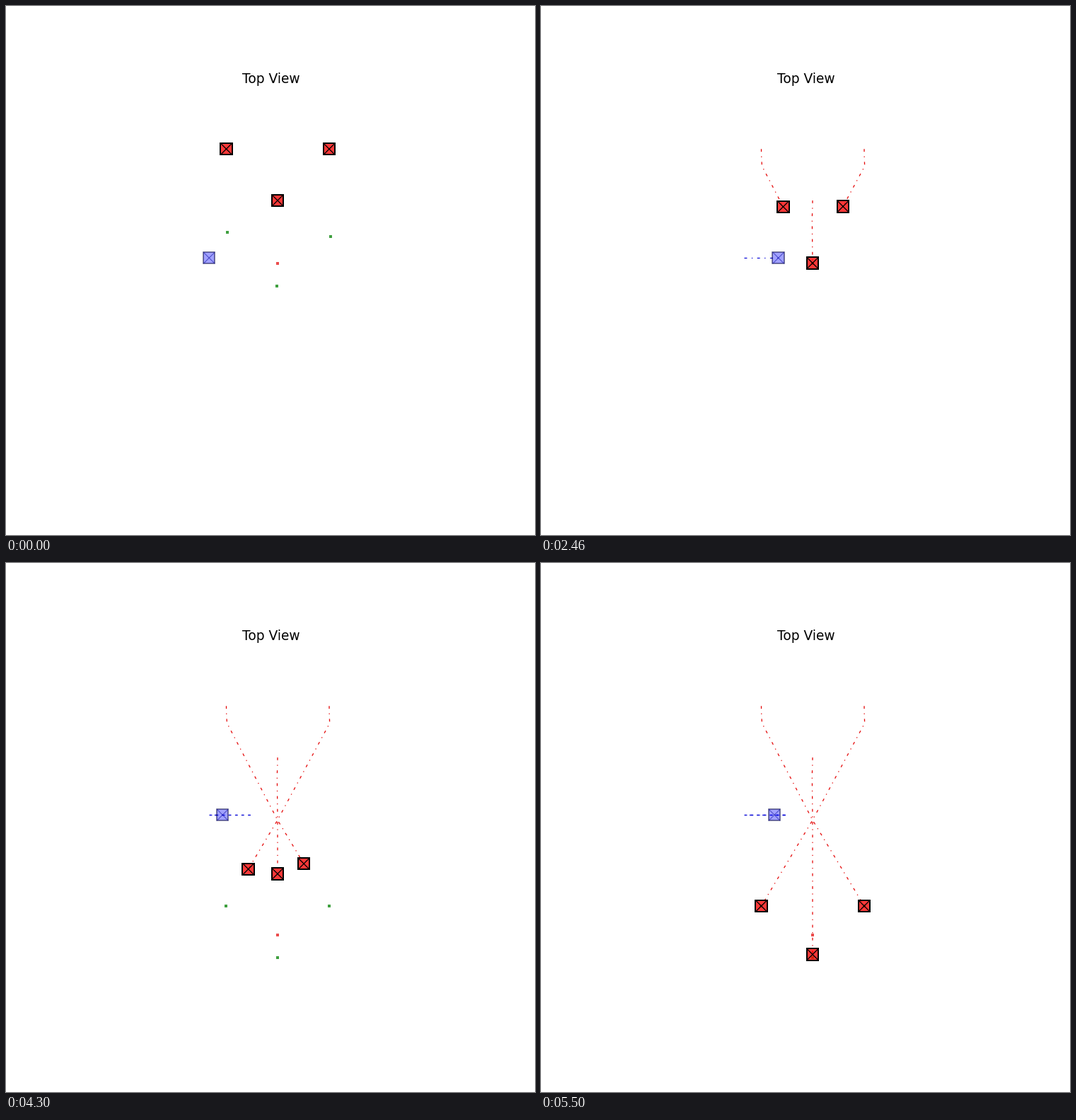
A matplotlib script for the animation above (7080 ms loop, 748 by 748 pixels).

```python
import numpy as np
import matplotlib.pyplot as plt
from matplotlib.animation import FuncAnimation
from matplotlib.patches import Rectangle

SIZE, DPI = 748, 100
PT = 72 / DPI                      # points per pixel
TICK, HOLD, STEP, LAST = 20, 1580, 80, 50
LOOP = 2 * HOLD + (LAST - 1) * STEP
GATE = np.array([384.0, 363.5])
GOAL = np.array([384.0, 525.5])
SHAPE = np.array([[-72.5, -40.5], [73.0, -40.5], [0.0, 32.4]])
TURN, REGROUP, LEAVE = 3, 4, 25    # steps at which the formation changes
HALF = 8.2


def slots(k):
    """Formation points: turning, then squeezed into the gate, then open."""
    if k < TURN:
        a = np.radians(2.2 + 3.4 * k)
        rot = np.array([[np.cos(a), -np.sin(a)], [np.sin(a), np.cos(a)]])
        return GATE + SHAPE @ rot.T
    if k < LEAVE:
        return np.tile(GATE, (3, 1))
    return GOAL + SHAPE


def walk(p, target, speed):
    d = target - p
    dist = np.hypot(*d)
    return target.copy() if dist <= speed else p + d * speed / dist


def simulate():
    pos = [np.array(p) for p in ((311.5, 202.2), (457.0, 202.2), (384.0, 275.0))]
    track = [pos]
    for k in range(1, LAST + 1):
        if k > LEAVE:
            goals, speeds = slots(k)[[1, 0, 2]], (7.2, 8.07, 7.6)
        else:
            goals, speeds = slots(k - 1), (8.09,) * 3
        if k != REGROUP:
            pos = [walk(p, g, s) for p, g, s in zip(pos, goals, speeds)]
        track.append(pos)
    return np.array(track)


def patrol():
    u = np.arange(LAST + 1) % 30.3
    x = 287.2 + 4.04 * np.minimum(u, 30.3 - u)
    return np.column_stack([x, np.full(LAST + 1, 356.2)])


fig = plt.figure(figsize=(SIZE / DPI, SIZE / DPI), dpi=DPI, facecolor="white")
ax = fig.add_axes([0, 0, 1, 1])
ax.set_xlim(0, SIZE)
ax.set_ylim(SIZE, 0)
ax.axis("off")
ax.text(374.5, 109, "Top View", family="DejaVu Sans", size=18.7 * PT,
        ha="center", va="baseline")


class Drone:
    def __init__(self, track, trail, face, edge, cross, edge_px, cross_px, z):
        self.track = track
        self.trail, = ax.plot([], [], color=trail, lw=1.3 * PT,
                              ls=(0, (3, 5, 1, 5)), zorder=2)
        self.body = Rectangle((0, 0), 2 * HALF, 2 * HALF, fc=face, ec=edge,
                              lw=edge_px * PT, zorder=z)
        ax.add_patch(self.body)
        self.cross, = ax.plot([], [], color=cross, lw=cross_px * PT, zorder=z)

    def show(self, k):
        x, y = self.track[k]
        self.trail.set_data(*self.track[:k + 1].T)
        self.body.set_xy((x - HALF, y - HALF))
        h = HALF - 0.5
        self.cross.set_data([x - h, x + h, np.nan, x - h, x + h],
                            [y - h, y + h, np.nan, y + h, y - h])


def dots(color, px, z):
    return ax.plot([], [], ls="", marker="s", ms=px * PT, color=color,
                   mew=0, zorder=z)[0]


slot_dots = dots((0.0, 0.5, 0.0, 0.75), 3.6, 1.0)
centre_dot = dots((0.9, 0.1, 0.1, 0.78), 4.0, 1.1)

team = simulate()
drones = [Drone(team[:, i], (0.9, 0.05, 0.05), (1, 0, 0, 0.78), "black",
                "black", 2.0, 1.3, 3 + 0.1 * i) for i in range(3)]
drones.append(Drone(patrol(), (0.05, 0.05, 0.85), (0, 0, 1, 0.37),
                    (0, 0, 0.25, 0.65), (0.1, 0.1, 0.65, 0.6), 1.5, 1.1, 3.5))


def update(n):
    t = n * TICK
    k = 0 if t < HOLD else min(LAST, 1 + (t - HOLD) // STEP)
    for d in drones:
        d.show(k)
    slot_dots.set_data(*slots(k).T)
    centre_dot.set_data(*(GATE if k < LEAVE else GOAL)[:, None])
    return []


anim = FuncAnimation(fig, update, frames=LOOP // TICK, interval=TICK,
                     init_func=lambda: update(0), repeat=True,
                     repeat_delay=0, cache_frame_data=False)
plt.show()
```
